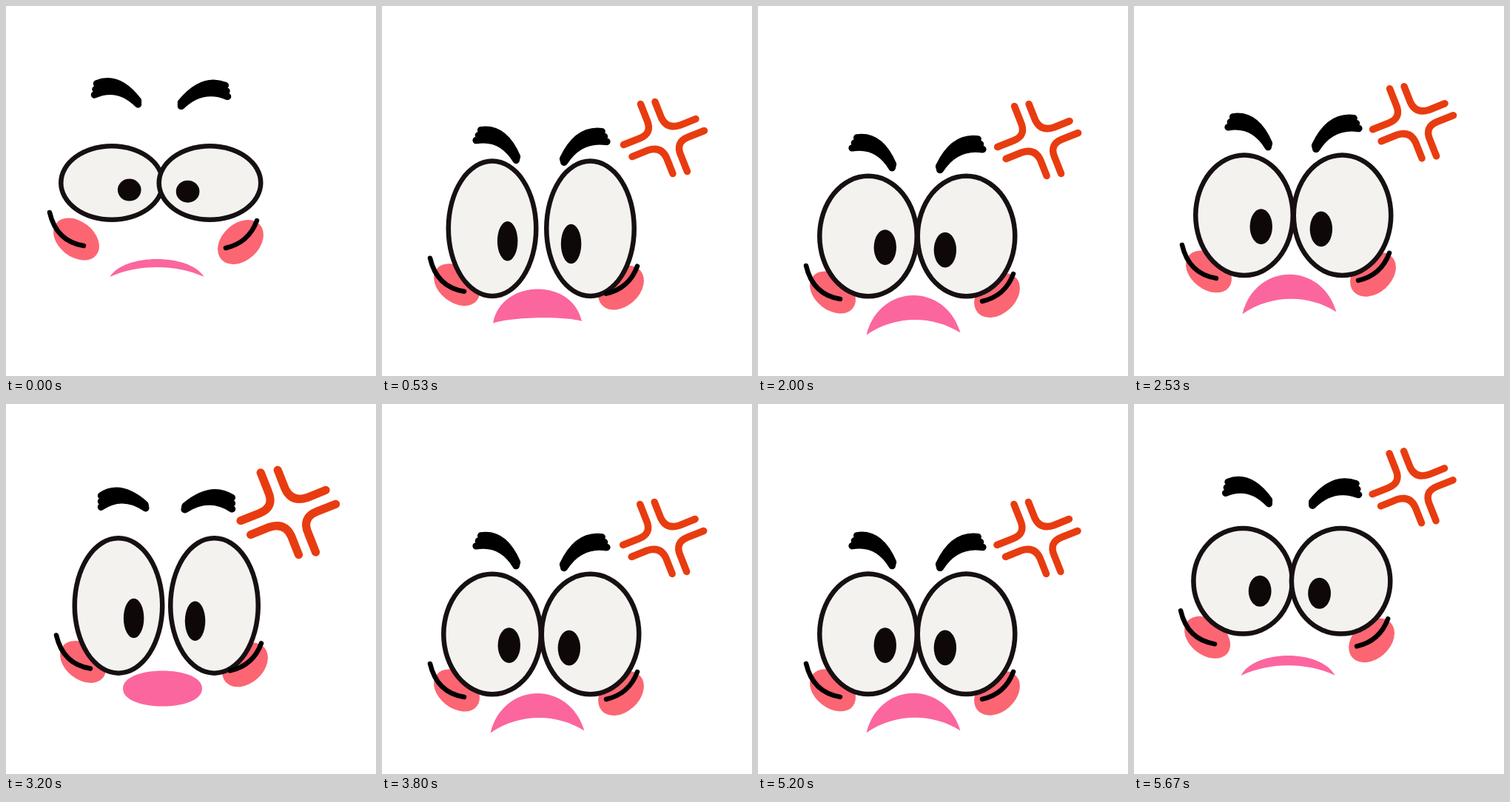
Write an HTML page with a canvas that moves like this. It is 500 px wide and 500 px high and loops after 5740 ms.

```html
<!DOCTYPE html>
<html lang="en">
<head>
<meta charset="utf-8">
<title>Angry face</title>
<style>
  html, body { margin: 0; width: 100%; height: 100%; overflow: hidden; background: #fff; }
  canvas { display: block; width: 100vmin; height: 100vmin; }
</style>
</head>
<body>
<canvas id="stage" width="500" height="500"></canvas>
<script>
const ctx = document.getElementById('stage').getContext('2d');
const LOOP = 5740, STEPS = 86, CYCLE = STEPS / 2;

const leftLine = new Path2D('M-36-36Q-27 3 10 9');
const rightLine = new Path2D('M22-29Q11 1-20 8');
const vein = new Path2D('M-31.5-45.5L-23-24Q-15-6-33 1L-54.5 9.5' +
  'M-12-48.5L-3.5-27Q4-11 22-17L43-25.5');

function ease(t, from, to) {
  const u = Math.max(0, Math.min(1, (t - from) / (to - from)));
  return u * u * (3 - 2 * u);
}

// Runs from 0 up to 1 between a and b, and back to 0 between c and d
const pulse = (t, a, b, c, d) => ease(t, a, b) - ease(t, c, d);

function at(x, y, draw, angle = 0, sx = 1, sy = sx) {
  ctx.save();
  ctx.translate(x, y);
  ctx.rotate(angle * Math.PI / 180);
  ctx.scale(sx, sy);
  draw();
  ctx.restore();
}

function oval(x, y, rx, ry, color, angle = 0) {
  ctx.beginPath();
  ctx.ellipse(x, y, rx, ry, angle * Math.PI / 180, 0, 2 * Math.PI);
  ctx.fillStyle = color;
  ctx.fill();
}

function line(path, color, width) {
  ctx.strokeStyle = color;
  ctx.lineWidth = width;
  ctx.stroke(path);
}

function eye(x, y, rx, ry, px, py) {
  oval(x, y, rx, ry, '#171012');
  oval(x, y, rx - 6.5, ry - 6.5, '#f3f2ef');
  oval(x + px * rx, y + py * ry, rx * .22, ry * .283, '#0f0809');
}

// Three brush strokes, fanned out at the outer end
function brow() {
  for (let i = 0; i < 3; i++) {
    const path = new Path2D();
    path.moveTo(-27 - 1.5 * i, -18 + 7.5 * i);
    path.quadraticCurveTo(2, -30 + 6.5 * i, 29, 5 + 2.5 * i);
    line(path, '#000', 9.5);
  }
}

function mouth(w, top, bottom, inset) {
  const r = w / 2, up = -top / .75, low = -bottom / .75;
  ctx.beginPath();
  ctx.moveTo(-r, 0);
  ctx.bezierCurveTo(inset - r, up, r - inset, up, r, 0);
  ctx.bezierCurveTo(r - 2 * inset, low, 2 * inset - r, low, -r, 0);
  ctx.fillStyle = '#fb669e';
  ctx.fill();
}

function render(step) {
  const t = step % CYCLE;
  const drop = pulse(t, 0, 10.5, 34.8, 42.3);
  const open = pulse(t, 0, 5, 41.4, 43);
  const stretch = pulse(t, 0, 5, 8, 12);
  const startle = pulse(t, 0, 5, 5, 8);
  const gape = pulse(t, 0, 5, 5, 10);
  const angry = pulse(t, 5, 8, 38, 43);
  const sway = pulse(t, 8, 10, 11, 14);

  const x = 95 + 6 * open + 3 * startle - 12 * sway;
  const y = 315 + 72 * drop;
  const right = x + 222 - 3 * startle;

  ctx.fillStyle = '#fff';
  ctx.fillRect(0, 0, 500, 500);
  ctx.lineCap = ctx.lineJoin = 'round';

  oval(x, y, 34.6, 24, '#fb6672', 38);
  oval(right, y + 4, 35, 25, '#fb6672', -42);

  const w = 127 - 20 * gape;
  at((x + right) / 2 - 2, y + 51 + 5 * angry - 15 * gape, () => mouth(
    w, 24 + angry * (28 - 20 * gape), 13 + 6 * angry - 37 * gape, .15 * w * (1 - gape)
  ), -1.3 * angry);

  const rx = 72 - 3 * open - 6.5 * stretch;
  const ry = 53 + 31.5 * open + 10 * stretch;
  eye(x + 48, y - 76, rx, ry, .33, .18);
  eye(right - 41.5, y - 76, rx, ry, -.415, .22);
  at(x, y, () => line(leftLine, '#000', 6.5));
  at(right, y + 4, () => line(rightLine, '#000', 6.5));

  const browY = y - 192 + 7 * angry - 20 * startle;
  const tilt = 14 * angry - 11 * startle;
  at(x + 54.5, browY, brow, tilt);
  at(right - 49.5, browY + 2.3, brow, -tilt, -1.06, 1);

  // The anger mark pops in right after the loop starts
  if (step) {
    const markY = 112 + 69 * pulse(t, 1, 9, 35.2, 42.3);
    for (const turn of [0, 180]) {
      at(382 - .13 * t, markY, () => line(vein, '#e83c10', 9.5), turn, 1 + .18 * startle);
    }
  }
}

const start = performance.now();
function tick() {
  const t = (performance.now() - start) % LOOP;
  render(Math.min(STEPS - 1, Math.floor((t + 5) * .015)));
  requestAnimationFrame(tick);
}
tick();
</script>
</body>
</html>
```
